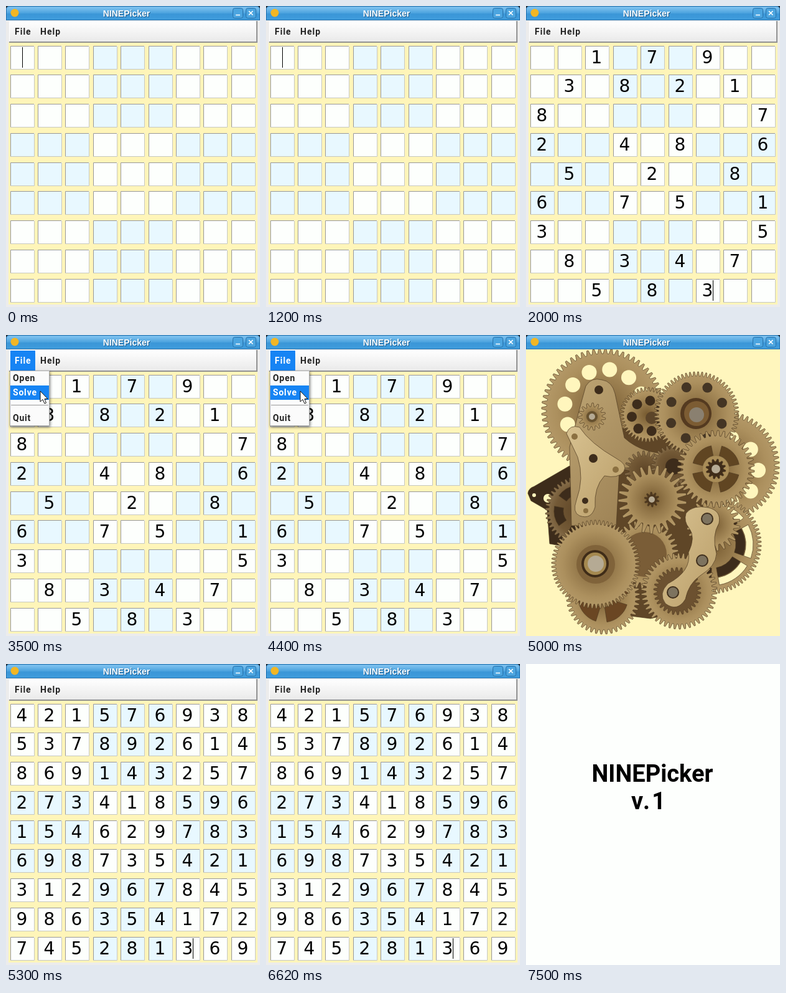
Animation of 408x483 px, one loop 9 s. Source, as an HTML page:

```html
<!DOCTYPE html>
<html lang="en">
<head>
<meta charset="utf-8">
<title>NINEPicker</title>
<style>
html, body { margin: 0; width: 100%; height: 100%; overflow: hidden; background: #fdfffd; }
svg { display: block; width: 408px; height: 483px; }
.title { font: bold 14px "Liberation Sans", Arial, sans-serif; text-anchor: middle; }
.menu { font: bold 14px Roboto, sans-serif; letter-spacing: 1px; fill: #222; }
.menu .on { fill: #fff; }
.drop { letter-spacing: .8px; }
.digits { font: 28px "DejaVu Sans", sans-serif; text-anchor: middle; }
.splash { font: bold 38px Roboto, sans-serif; text-anchor: middle; }
.version { letter-spacing: 3px; }

.layer { visibility: hidden; animation: 9s step-end infinite; }
#start { animation-name: start; }
#givens { animation-name: givens; }
#caret { animation-name: caret; }
#popup { animation-name: popup; }
#gears { animation-name: gears; }
#solved { animation-name: solved; }
#end { animation-name: end; }
@keyframes start { 0% { visibility: visible } 22.222%, 100% { visibility: hidden } }
@keyframes givens { 0%, 55.5555%, 100% { visibility: hidden } 22.222% { visibility: visible } }
@keyframes caret { 0%, 38.8888%, 83.3333%, 100% { visibility: hidden } 22.222%, 58.8888% { visibility: visible } }
@keyframes popup { 0%, 55.5555%, 100% { visibility: hidden } 38.8888% { visibility: visible } }
@keyframes gears { 0%, 58.8888%, 100% { visibility: hidden } 55.5555% { visibility: visible } }
@keyframes solved { 0%, 83.3333%, 100% { visibility: hidden } 58.8888% { visibility: visible } }
@keyframes end { 0% { visibility: hidden } 83.3333%, 100% { visibility: visible } }
</style>
</head>
<body>
<svg viewBox="0 0 408 483">
  <defs>
    <linearGradient id="bar" x2="0" y2="1">
      <stop offset="0" stop-color="#5fb0e6"/><stop offset=".12" stop-color="#7cc0ee"/>
      <stop offset=".5" stop-color="#4ba2de"/><stop offset=".55" stop-color="#3b96d7"/>
      <stop offset="1" stop-color="#3f9ddd"/>
    </linearGradient>
    <linearGradient id="strip" x2="0" y2="1">
      <stop offset="0" stop-color="#fff"/><stop offset="1" stop-color="#e9e9e9"/>
    </linearGradient>
    <radialGradient id="brass">
      <stop offset="0" stop-color="#75592f"/><stop offset=".4" stop-color="#94784a"/>
      <stop offset=".75" stop-color="#ac905e"/><stop offset="1" stop-color="#b59a69"/>
    </radialGradient>
    <radialGradient id="dull">
      <stop offset="0" stop-color="#5d4426"/><stop offset=".7" stop-color="#735936"/>
      <stop offset="1" stop-color="#8b7350"/>
    </radialGradient>
    <linearGradient id="plate" x2="1" y2="1">
      <stop offset="0" stop-color="#bda473"/><stop offset="1" stop-color="#92764a"/>
    </linearGradient>
    <linearGradient id="pale" x2="1" y2="1">
      <stop offset="0" stop-color="#d8c291"/><stop offset="1" stop-color="#b99d68"/>
    </linearGradient>
    <filter id="soft" x="-20%" y="-20%" width="140%" height="140%">
      <feDropShadow dx="1" dy="2" stdDeviation="2" flood-opacity=".5"/>
    </filter>
  </defs>

  <rect y="22" width="408" height="461" fill="#ececec"/>
  <rect x="4" y="58" width="400" height="421" fill="#fff5b9"/>
  <rect x="5" y="24" width="398" height="34" fill="url(#strip)"/>
  <path d="M5.5 58V24.5H403" fill="none" stroke="#fff"/>
  <path d="M5 58H403V24" fill="none" stroke="#929292" stroke-width="2"/>
  <g class="menu"><text x="14" y="46">File</text><text x="55" y="46">Help</text></g>
  <g id="cells"></g>

  <path id="start" class="layer" d="M26.5 66V99" stroke="#000"/>
  <g id="givens" class="layer digits"></g>
  <g id="solved" class="layer digits"></g>
  <path id="caret" class="layer" d="M300.5 440V473" stroke="#000"/>

  <g id="popup" class="layer menu">
    <rect x="7" y="25" width="40" height="32" fill="#1684f4"/>
    <text class="on" x="14" y="46">File</text>
    <rect x="6.5" y="57.5" width="63" height="88" fill="#fbfbfb" stroke="#aaa" filter="url(#soft)"/>
    <rect x="7" y="81" width="62" height="23" fill="#1684f4"/>
    <path d="M8 112.5H68" stroke="#999"/>
    <g class="drop">
      <text x="11" y="74">Open</text>
      <text class="on" x="11" y="97">Solve</text>
      <text x="11" y="138">Quit</text>
    </g>
    <path d="M55 90V107L59 103.5L62 110L64.5 109L62 102.5H67Z" fill="#fff" stroke="#111"/>
  </g>

  <g id="gears" class="layer"><rect y="22" width="408" height="461" fill="#fff6bd"/></g>

  <g id="titlebar">
    <rect width="408" height="6" fill="#202830"/>
    <path d="M0 23V6Q0 0 6 0H402Q408 0 408 6V23Z" fill="url(#bar)"/>
    <path d="M0 22.5H408M.5 22V6Q.5 .5 6 .5H402Q407.5 .5 407.5 6V22" fill="none" stroke="#2873ae"/>
    <circle cx="14" cy="11" r="6.5" fill="#f2b624"/>
    <text class="title" x="194.5" y="18" fill="#1d5b8c">NINEPicker</text>
    <text class="title" x="193.5" y="17" fill="#fff">NINEPicker</text>
    <g fill="#4ca5e0" stroke="#276fa8">
      <rect x="364.5" y="3.5" width="16" height="16" rx="3"/>
      <rect x="385.5" y="3.5" width="16" height="16" rx="3"/>
    </g>
    <path d="M369 14.5H376M390 8L396.500 14.500M396.500 8L390 14.500" stroke="#fff" stroke-width="1.6"/>
  </g>

  <g id="end" class="layer splash">
    <rect width="408" height="483" fill="#fdfffd"/>
    <text x="203" y="189">NINEPicker</text>
    <text class="version" x="198" y="233">v.1</text>
  </g>
</svg>
<script>
const byId = id => document.getElementById(id);
const add = (id, markup) => byId(id).insertAdjacentHTML("beforeend", markup);
const colX = c => Math.floor(7 + c * 44.4);
const rowY = r => Math.floor(64 + r * 46.75);

const solution = "421576938 537892614 869143257 273418596 154629783 698735421 312967845 986354172 745281369".split(" ");
const clues = "..1.7.9.. .3.8.2.1. 8.......7 2..4.8..6 .5..2..8. 6..7.5..1 3.......5 .8.3.4.7. ..5.8.3..".split(" ");

let cells = "";
for (let r = 0; r < 9; r++) {
  for (let c = 0; c < 9; c++) {
    const x = colX(c), y = rowY(r);
    const blue = (Math.floor(r / 3) + Math.floor(c / 3)) % 2;
    cells += `<rect x="${x}" y="${y}" width="39" height="38" fill="${blue ? "#e8f8ff" : "#fdfffd"}"/>
      <path d="M${x + .5} ${y + 37}V${y + .5}H${x + 38}" fill="none" stroke="#989898"/>
      <path d="M${x + 38.5} ${y + 1}V${y + 37.5}H${x}" fill="none" stroke="#c6c8c0"/>`;
  }
}
add("cells", cells);

function digits(rows) {
  return rows.map((row, r) => [...row].map((d, c) =>
    d === "." ? "" : `<text x="${colX(c) + 18.5}" y="${rowY(r) + 28}">${d}</text>`).join("")).join("");
}
add("givens", digits(clues));
add("solved", digits(solution));

const polar = (x, y, r, a) => `${(x + r * Math.cos(a)).toFixed(1)} ${(y + r * Math.sin(a)).toFixed(1)}`;
const shape = (d, fill) => `<path d="${d}" fill="${fill}" stroke="#4f3b21" stroke-width=".7"/>`;
const disc = (x, y, r, fill) => `<circle cx="${x}" cy="${y}" r="${r}" fill="${fill}"/>`;

function gear(x, y, r, teeth, depth = 7, fill = "url(#brass)") {
  const step = 2 * Math.PI / teeth, points = [];
  for (let i = 0; i < teeth; i++) {
    for (const [f, d] of [[0, depth], [.25, 0], [.5, 0], [.75, depth]]) {
      points.push(polar(x, y, r - d, (i + f) * step));
    }
  }
  return shape(`M${points.join("L")}Z`, fill);
}
function holes(x, y, ring, n, r, fill, turn = 0) {
  let s = "";
  for (let i = 0; i < n; i++) {
    const [px, py] = polar(x, y, ring, turn + i * 2 * Math.PI / n).split(" ");
    s += disc(px, py, r, fill);
  }
  return s;
}
// Curved windows between the spokes of a wheel
function windows(x, y, inner, outer, n, fill, turn = 0, spoke = .45) {
  let s = "";
  for (let i = 0; i < n; i++) {
    const a = turn + i * 2 * Math.PI / n, b = a + 2 * Math.PI / n - spoke;
    s += shape(`M${polar(x, y, outer, a)}A${outer} ${outer} 0 0 1 ${polar(x, y, outer, b)}L${polar(x, y, inner, b)}A${inner} ${inner} 0 0 0 ${polar(x, y, inner, a)}Z`, fill);
  }
  return s;
}
const screw = (x, y) => disc(x, y, 10, "#3f2f1d") + disc(x, y, 8, "#7d735f");

const dark = "#3d2c1b", sky = "#fff6bd", steel = "#b5aa94";
add("gears", [
  shape("M3 254Q4 246 13 243L70 210L95 240V345L38 335L34 281L8 266Z", dark),
  disc(35, 262, 7, sky), disc(13, 257, 3, sky),
  gear(124, 121, 99, 64, 8), holes(126, 119, 64, 12, 12, sky, -1.44),
  gear(320, 210, 87, 64, 8), holes(321, 217, 52, 9, 12, sky),
  gear(299, 336, 79, 72), windows(299, 336, 38, 53, 6, dark, -.5, .2), windows(299, 336, 54, 66, 6, sky, -.5, .2),
  shape("M75 150L215 150L300 220L290 370L270 440L200 455L80 440L68 390Z", "#5f4627"),
  gear(86, 282, 55, 46, 6, "url(#dull)"), windows(86, 282, 26, 41, 5, dark),
  gear(124, 421, 59, 44), windows(124, 421, 16, 40, 4, "#6a4623", .3),
  gear(190, 352, 55, 36, 9), disc(190, 352, 36, "#7a5d37"),
  gear(246, 411, 61, 46, 8), gear(243, 411, 38, 30, 6, "#6c5130"),
  shape("M70 180Q84 125 96 82Q105 67 122 72Q138 74 143 94L158 165Q190 195 250 190L240 225L150 215L145 306H73Z", "url(#plate)"),
  disc(117, 88, 7, dark),
  gear(190, 218, 32, 22, 8, "url(#dull)"), gear(235, 211, 34, 26, 6, "url(#dull)"), disc(237, 211, 13, dark),
  gear(195, 128, 44, 44, 6), holes(195, 130, 25, 7, 8, dark, .4), disc(202, 133, 10, "#5c4529"),
  gear(274, 127, 68, 64), holes(274, 125, 44, 8, 8, "#443524", -.38),
  disc(273, 126, 25, "#543a20"), disc(274, 126, 20, "#7c5c33"), disc(274, 128, 12, "#8a8070"),
  gear(106, 131, 22, 15, 6), disc(106, 131, 9, "#66512f"), disc(106, 131, 5, steel),
  gear(301, 304, 43, 24, 10),
  gear(305, 215, 62, 40, 9), windows(305, 215, 22, 38, 4, "#604522", .25),
  disc(305, 215, 21, "#a98d58"), gear(305, 215, 16, 12, 4, "#3f2c19"), disc(305, 215, 7, steel),
  gear(203, 264, 55, 25, 14), gear(202, 264, 12, 10, 4, "#4d371e"), disc(202, 264, 5, steel),
  shape("M65 158Q70 143 86 148Q103 174 145 198Q164 208 157 219Q148 231 126 226Q109 244 111 276Q105 297 86 290Q74 285 81 265Q94 230 83 196Z", "url(#pale)"),
  disc(78, 163, 5, "#8b7041"), disc(108, 198, 7, dark), disc(144, 216, 5, "#8b7041"), disc(95, 266, 5, dark), disc(96, 282, 4, "#8b7041"),
  gear(112, 368, 71, 66), disc(112, 368, 31, "#80633a"),
  disc(111, 367, 22, "#3f2c18"), disc(111, 367, 18, "#a58950"), disc(112, 367, 13, steel),
  shape("M257 286Q268 272 293 277Q314 282 310 302Q298 322 306 351Q305 371 280 386Q261 399 256 424Q243 445 224 431Q212 415 228 399Q266 379 261 349Q273 324 262 310Q253 299 257 286Z", "url(#pale)"),
  screw(291, 295), screw(283, 362), screw(236, 413)
].join(""));
</script>
</body>
</html>
```
